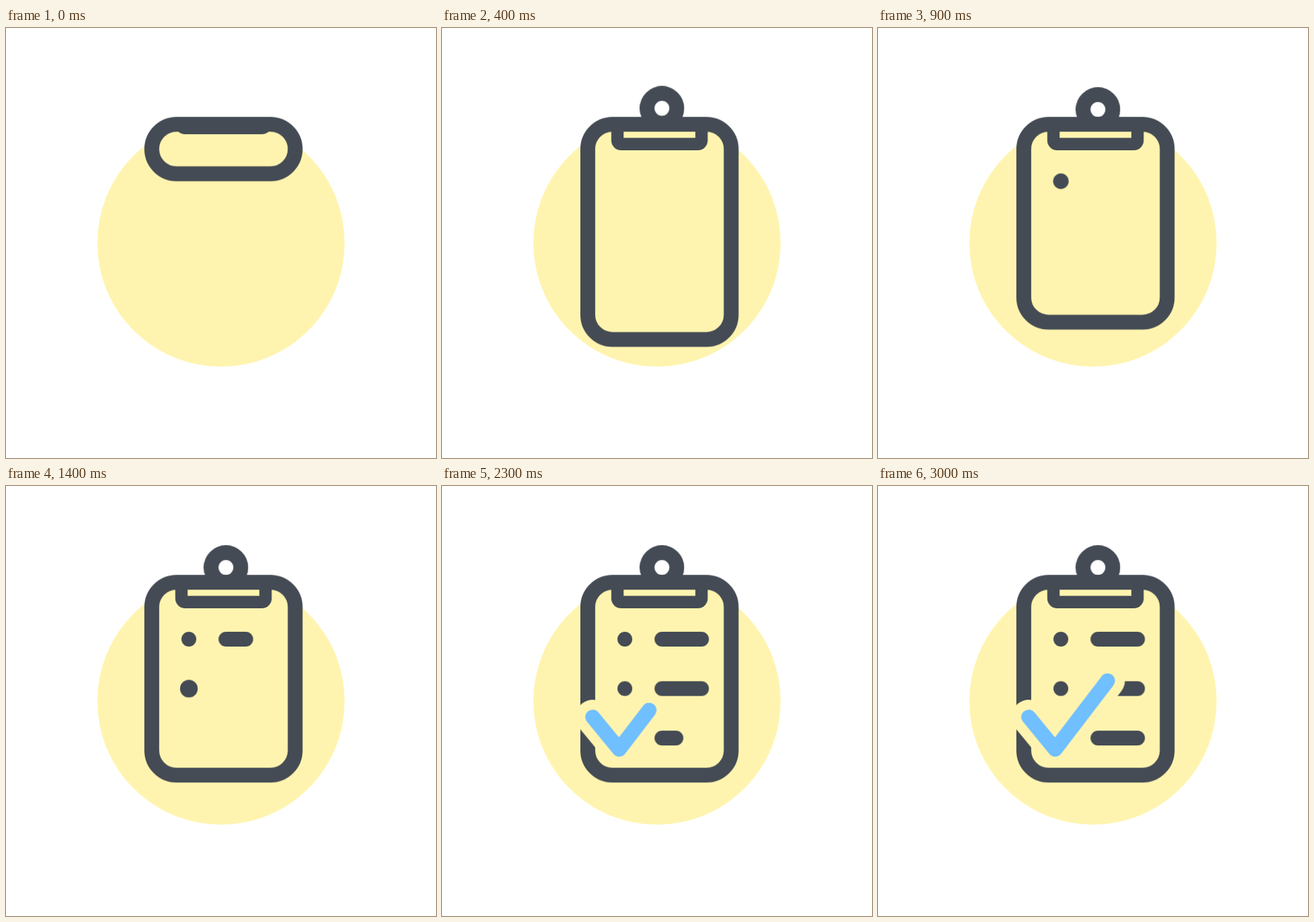
Animation, 640 px wide and 640 px high, one loop 4.4 s. Source, as an HTML page:

```html
<!DOCTYPE html>
<html lang="en">
<head>
<meta charset="utf-8">
<title>Checklist</title>
<style>
  :root { --ink: #444b54; --sun: #fff4af; --tick: #70bfff; --ease: cubic-bezier(.33, 0, .67, 1); }
  html, body { margin: 0; width: 100%; height: 100%; overflow: hidden; background: #fff; }
  svg { display: block; width: 100vw; height: 100vh; }

  .stroke { fill: none; stroke: var(--ink); stroke-width: 6; stroke-linecap: round; stroke-linejoin: round; }
  .ink { fill: var(--ink); }
  .board { animation: grow 400ms var(--ease) both, settle 730ms cubic-bezier(.65, 0, .35, 1) 450ms forwards; }
  .tab { animation: drop 360ms var(--ease) both; }
  .ring { animation: rise 800ms both; }
  .dot { transform-box: fill-box; transform-origin: center; animation: pop 350ms var(--ease) var(--at) both; }
  .draw { stroke-dasharray: 1 2; animation: draw var(--for, 400ms) var(--ease) var(--at) both; }
  .check { --at: 1900ms; --for: 620ms; stroke: var(--tick); }
  .halo { stroke: var(--sun); stroke-width: 14; }

  @keyframes grow { from { height: 20px; } to { height: 87px; } }
  @keyframes settle { from { height: 87px; } to { height: 78px; } }
  @keyframes drop { from { transform: translateY(-6.5px); } to { transform: none; } }
  @keyframes rise {
    0% { transform: translateY(12px); animation-timing-function: linear; }
    62.5% { transform: translateY(-3.6px); animation-timing-function: cubic-bezier(.4, .2, .6, 1); }
    100% { transform: translateY(0); }
  }
  @keyframes pop {
    0% { transform: scale(0); }
    57% { transform: scale(1.19); }
    100% { transform: scale(1); }
  }
  @keyframes draw {
    0% { stroke-dashoffset: 1; opacity: 0; }
    1%, 100% { opacity: 1; }
    100% { stroke-dashoffset: 0; }
  }
</style>
</head>
<body>
<svg viewBox="0 0 640 640">
  <defs>
    <clipPath id="above"><rect x="30" y="-30" width="44" height="29"/></clipPath>
    <clipPath id="inside"><rect x="24" y="2" width="56" height="30"/></clipPath>
  </defs>
  <g transform="translate(136 136) scale(3.68)">
    <circle cx="50" cy="50" r="50" fill="var(--sun)"/>

    <g clip-path="url(#above)">
      <circle class="stroke ring" cx="52" cy="-4" r="6"/>
    </g>
    <g clip-path="url(#inside)">
      <path class="ink tab" d="M31.5 0V8.5a4 4 0 0 0 4 4H66.5a4 4 0 0 0 4-4V0H65.5V7.5H36.5V0Z"/>
    </g>
    <rect class="stroke board" x="22" y="2" width="58" height="78" rx="10"/>

    <circle class="ink dot" style="--at: 600ms" cx="37" cy="25" r="3"/>
    <circle class="ink dot" style="--at: 1200ms" cx="37" cy="45" r="3"/>
    <path class="stroke draw" style="--at: 1200ms" pathLength="1" d="M52 25H68"/>
    <path class="stroke draw" style="--at: 1760ms" pathLength="1" d="M52 45H68"/>
    <path class="stroke draw" style="--at: 2140ms" pathLength="1" d="M52 65H68"/>

    <path class="stroke draw check halo" pathLength="1" d="M24 56.5 34.7 69.5 55.9 41.8"/>
    <path class="stroke draw check" pathLength="1" d="M24 56.5 34.7 69.5 55.9 41.8"/>
  </g>
</svg>
<script>
  // Run all CSS animations on one looping clock that ticks ten times a second.
  const LOOP = 4400, TICK = 100;
  const parts = document.getAnimations();
  const start = performance.now();
  parts.forEach(part => part.pause());

  function show() {
    const time = (performance.now() - start + 1) % LOOP;
    const step = Math.floor(time / TICK) * TICK;
    parts.forEach(part => { part.currentTime = step; });
    requestAnimationFrame(show);
  }
  show();
</script>
</body>
</html>
```
